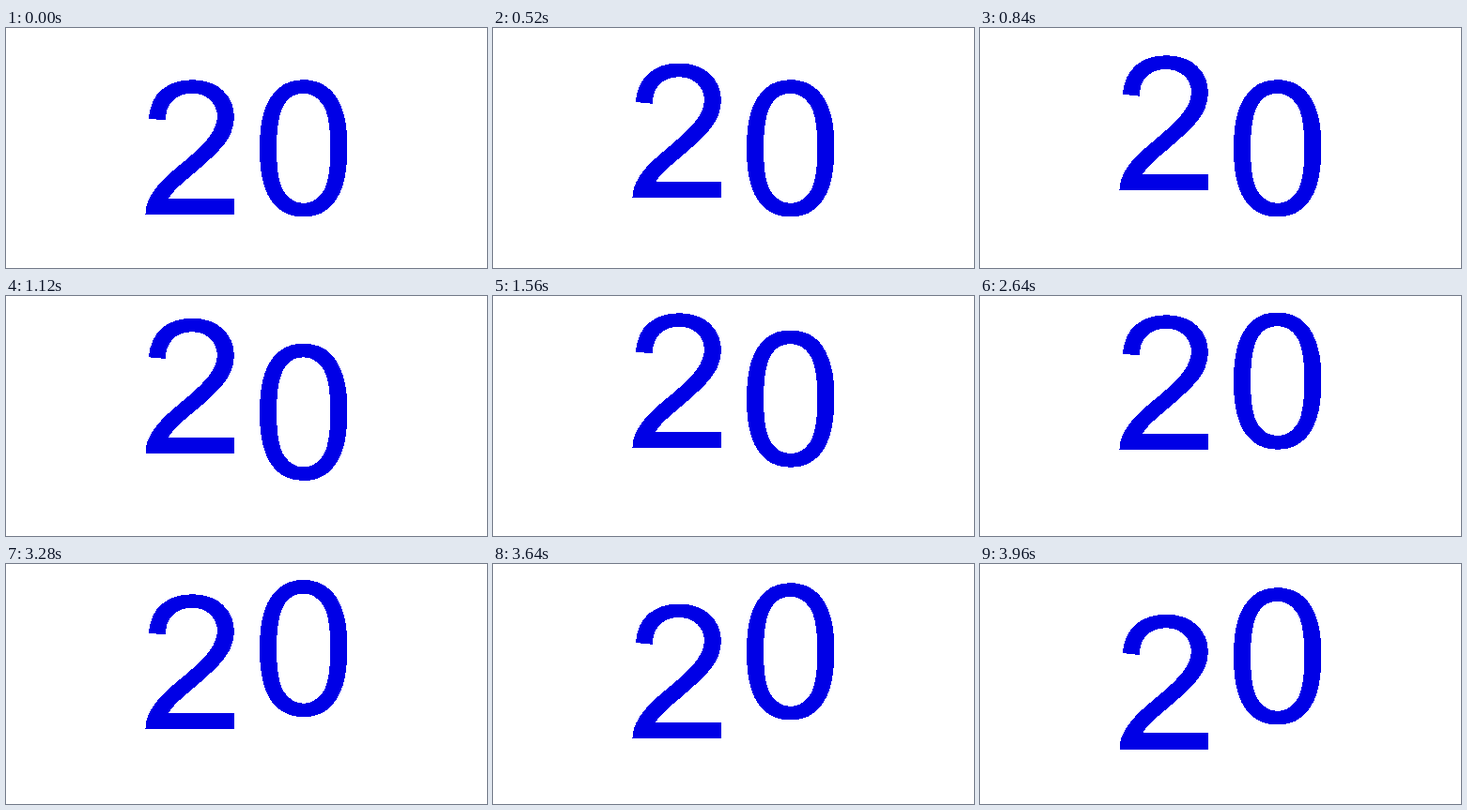
An HTML page with a canvas that plays this animation: 512 by 256 pixels, repeating every 4000 ms.

```html
<!DOCTYPE html>
<html lang="en">
<head>
<meta charset="utf-8">
<title>20</title>
<style>
html, body { margin: 0; width: 100%; height: 100%; overflow: hidden; background: #fff; }
canvas { display: block; }
</style>
</head>
<body>
<canvas id="stage" width="512" height="256" role="img" aria-label="20"></canvas>
<script>
const W = 512, H = 256;
const ctx = document.getElementById('stage').getContext('2d', { willReadFrequently: true });
const LOOP = 4000, STEP = 40;
const HEIGHT = 39, BASELINE = 199;
const SCALE = 200 / 2048;

// Outlines in font units, y pointing up.
const two = new Path2D(
  'M1031 173v-173h-969q-2 65 21 125q37 99 118.5 195t235.5 222' +
  'q239 196 323 310.5t84 216.5q0 107 -76.5 180.5t-199.5 73.5' +
  'q-130 0 -208 -78t-79 -216l-185 19' +
  'q19 207 143 315.5t333 108.5q211 0 334 -117t123 -290' +
  'q0 -88 -36 -173t-119.5 -179t-277.5 -258q-162 -136 -208 -184.5t-76 -97.5z'
);
const zero = new Path2D(
  'M85 723q0 260 53.5 418.5t159 244.5t265.5 86' +
  'q118 0 207 -47.5t147 -137t91 -218t33 -346.5' +
  'q0 -258 -53 -416.5t-158.5 -245t-266.5 -86.5q-213 0 -334 152q-145 183 -145 596z' +
  'M270 723q0 -361 84.5 -480.5t208.5 -119.5t208.5 120t84.5 480' +
  'q0 362 -84.5 481t-210.5 119q-124 0 -198 -105q-93 -134 -93 -495z'
);

const digits = [
  { shape: two, x: 142.4, delay: 0 },
  { shape: zero, x: 261.7, delay: 1000 }
];

// Parabolic hop lasting one loop; at rest until its delay has passed.
function lift(t, delay) {
  const u = Math.max(0, t - delay) / LOOP;
  return HEIGHT * 4 * u * (1 - u);
}

// Turns soft edge pixels fully on or off.
function hardenEdges() {
  const image = ctx.getImageData(0, 0, W, H);
  const px = image.data;
  for (let i = 3; i < px.length; i += 4) px[i] = px[i] < 128 ? 0 : 255;
  ctx.putImageData(image, 0, 0);
}

function draw(now) {
  const t = Math.floor((now % LOOP) / STEP) * STEP;
  ctx.setTransform(1, 0, 0, 1, 0, 0);
  ctx.clearRect(0, 0, W, H);
  ctx.fillStyle = '#0000e6';
  for (const { shape, x, delay } of digits) {
    ctx.setTransform(SCALE, 0, 0, -SCALE, x, BASELINE - lift(t, delay));
    ctx.fill(shape, 'evenodd');
  }
  hardenEdges();
}

function tick() {
  draw(performance.now());
  requestAnimationFrame(tick);
}
tick();
</script>
</body>
</html>
```
